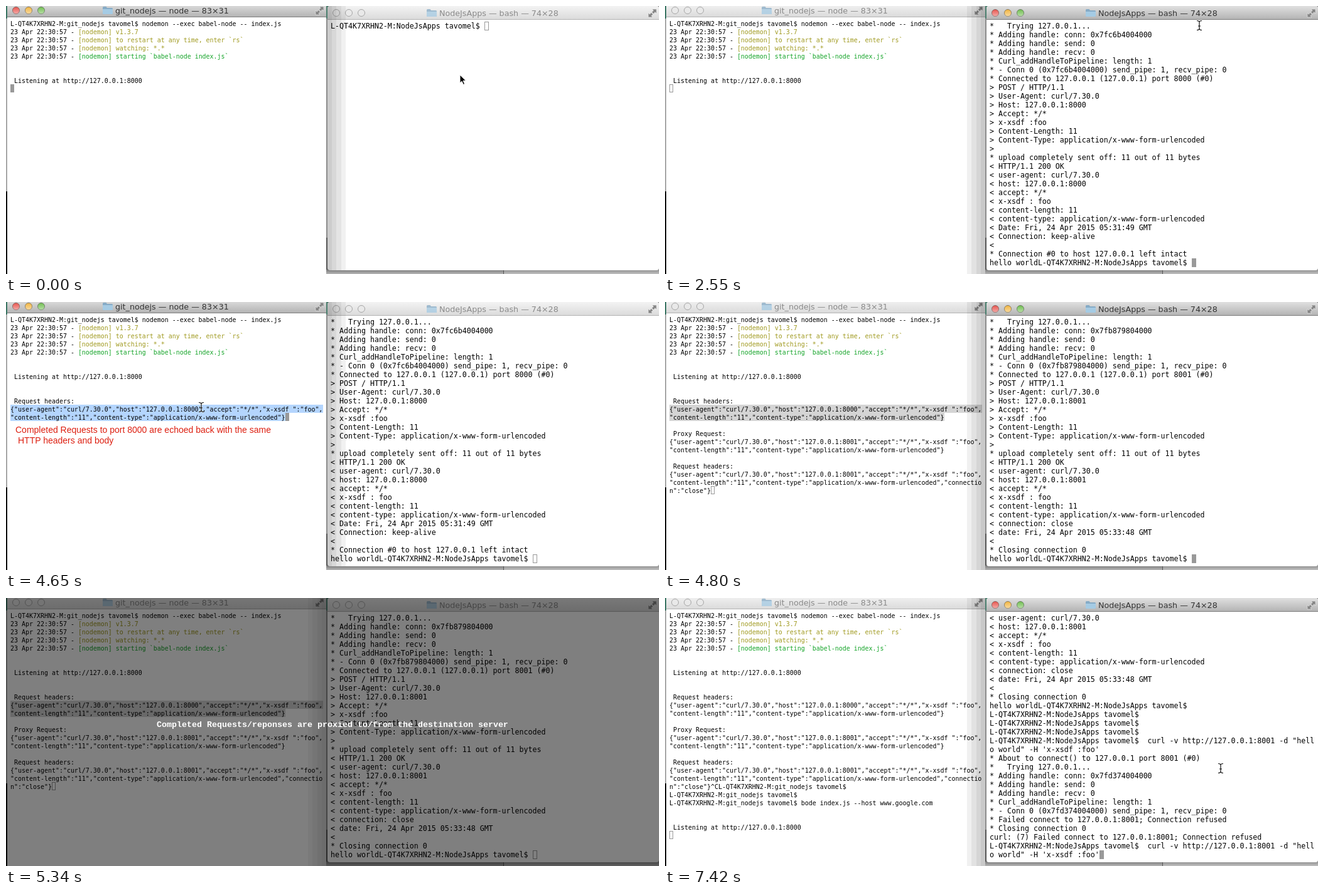
Write an HTML page that moves like this. It is 1040 by 428 pixels and loops after 8 s.

```html
<!DOCTYPE html>
<html lang="en">
<head>
<meta charset="utf-8">
<title>Echo and proxy server</title>
<style>
html, body { margin: 0; width: 100%; height: 100%; overflow: hidden; background: #8c8c8c; }
svg { display: block; width: 1040px; height: 428px; }
text { white-space: pre; }
.small { font: 9.967px "DejaVu Sans Mono", monospace; }
.large { font: 11.627px "DejaVu Sans Mono", monospace; }
.title { font: 12.7px "DejaVu Sans", sans-serif; fill: #8a8a8a; }
.active .title { fill: #333; }
.note { font: 14px "Liberation Sans", Arial, sans-serif; fill: #dd1f10; }
.caption { font: bold 13.33px "Liberation Mono", monospace; fill: #fff; }
.scene { visibility: hidden; }
</style>
</head>
<body>
<svg id="stage" viewBox="0 0 1040 428" xmlns="http://www.w3.org/2000/svg">
  <defs>
    <linearGradient id="barOn" x2="0" y2="1"><stop stop-color="#e0e0e0"/><stop offset="1" stop-color="#b2b2b2"/></linearGradient>
    <linearGradient id="barOff" x2="0" y2="1"><stop stop-color="#f3f3f3"/><stop offset="1" stop-color="#dadada"/></linearGradient>
    <linearGradient id="gloss" x2="0" y2="1"><stop stop-color="#fff" stop-opacity=".1"/><stop offset="1" stop-color="#fff" stop-opacity=".55"/></linearGradient>
    <linearGradient id="floor" x2="0" y2="1"><stop stop-color="#7c7c7c"/><stop offset="1" stop-color="#b4b4b4"/></linearGradient>
    <g id="folder">
      <path d="M0 2.5q0-1.5 1.5-1.5h4l1.5 2h7.500q1.500 0 1.500 1.500V12q0 1-1 1H1q-1 0-1-1z" fill="#86abc6"/>
      <path d="M0 5h16v7q0 1-1 1H1q-1 0-1-1z" fill="#a5cbe4"/>
    </g>
    <path id="expand" d="M6 0h7v7l-2.200-2.200-2.600 2.600-2.600-2.600L8.200 2.200zM7 13H0V6l2.200 2.200 2.600-2.600 2.600 2.600L4.800 10.800z" fill="#858585" stroke="#eee" stroke-width=".6"/>
    <path id="beam" d="M-4-7.500q4 0 4 2.500q0-2.500 4-2.500M0-5V5M-4 7.500q4 0 4-2.500q0 2.500 4 2.500M-2 1h4" fill="none"/>
    <path id="arrow" d="M0 0v13l3-2.800 2.300 5.300 2.200-1-2.300-5.200h4.300z" fill="#000" stroke="#fff"/>
  </defs>
  <g id="desktop">
    <rect width="1040" height="428" fill="#8c8c8c"/>
    <rect width="2" height="296" fill="#a9a9a9"/>
    <rect y="296" width="2" height="132" fill="#0b0b0b"/>
    <rect width="2" height="20" fill="#3c7765"/>
    <rect x="506" width="8" height="20" fill="#4a7f6e"/>
    <rect x="510" y="370" width="2" height="58" fill="#555"/>
    <rect x="510" y="421" width="530" height="7" fill="url(#floor)"/>
    <rect x="792" y="421" width="1" height="7" fill="#555"/>
    <rect x="793" y="421" width="247" height="7" fill="#fff" opacity=".15"/>
  </g>
</svg>
<script>
const LOOP = 8000;
const HOST = 'L-QT4K7XRHN2-M', USER = 'tavomel';
const promptLeft = `${HOST}:git_nodejs ${USER}$`;
const promptRight = `${HOST}:NodeJsApps ${USER}$`;

// Terminal text
const stamp = '23 Apr 22:30:57 - [nodemon] ';
const boot = [
  promptLeft + ' nodemon --exec babel-node -- index.js',
  stamp + 'v1.3.7',
  stamp + 'to restart at any time, enter `rs`',
  stamp + 'watching: *.*',
  stamp + 'starting `babel-node index.js`',
  '', '', ' Listening at http://127.0.0.1:8000'
];
const agent = port => `{"user-agent":"curl/7.30.0","host":"127.0.0.1:${port}","accept":"*/*","x-xsdf ":"foo",`;
const body = '"content-length":"11","content-type":"application/x-www-form-urlencoded"';
const request = [...boot, '', '', ' Request headers:', agent(8000), body + '}'];
const proxied = [
  ...request, '', ' Proxy Request:', agent(8001), body + '}',
  '', ' Request headers:', agent(8001), body + ',"connectio', 'n":"close"}'
];
const stopped = [
  ...proxied.slice(0, -1), 'n":"close"}^C' + promptLeft, promptLeft,
  promptLeft + ' bode index.js --host www.google.com'
];

const curl = port => [
  `${promptRight}  curl -v http://127.0.0.1:${port} -d "hell`,
  `o world" -H 'x-xsdf :foo'`
];
const connect = id => [
  '*   Trying 127.0.0.1...',
  `* Adding handle: conn: ${id}`,
  '* Adding handle: send: 0',
  '* Adding handle: recv: 0',
  '* Curl_addHandleToPipeline: length: 1',
  `* - Conn 0 (${id}) send_pipe: 1, recv_pipe: 0`
];
const exchange = (port, id, ending) => [
  ...connect(id),
  `* Connected to 127.0.0.1 (127.0.0.1) port ${port} (#0)`,
  '> POST / HTTP/1.1',
  '> User-Agent: curl/7.30.0',
  `> Host: 127.0.0.1:${port}`,
  '> Accept: */*',
  '> x-xsdf :foo',
  '> Content-Length: 11',
  '> Content-Type: application/x-www-form-urlencoded',
  '>',
  '* upload completely sent off: 11 out of 11 bytes',
  '< HTTP/1.1 200 OK',
  '< user-agent: curl/7.30.0',
  `< host: 127.0.0.1:${port}`,
  '< accept: */*',
  '< x-xsdf : foo',
  '< content-length: 11',
  '< content-type: application/x-www-form-urlencoded',
  ...ending,
  `hello world${promptRight} `
];
const echoed = exchange(8000, '0x7fc6b4004000', [
  '< Date: Fri, 24 Apr 2015 05:31:49 GMT', '< Connection: keep-alive', '<',
  '* Connection #0 to host 127.0.0.1 left intact'
]);
const relayed = exchange(8001, '0x7fb879804000', [
  '< connection: close', '< date: Fri, 24 Apr 2015 05:33:48 GMT', '<',
  '* Closing connection 0'
]);
const prompts = Array(4).fill(promptRight + ' ');
const refused = [
  ...relayed.slice(17), ...prompts.slice(1), ...curl(8001),
  '* About to connect() to 127.0.0.1 port 8001 (#0)',
  ...connect('0x7fd374004000'),
  '* Failed connect to 127.0.0.1:8001; Connection refused',
  '* Closing connection 0',
  'curl: (7) Failed connect to 127.0.0.1:8001; Connection refused',
  ...curl(8001)
];

// Drawing helpers
const rect = (x, y, w, h, fill, more = '') =>
  `<rect x="${x}" y="${y}" width="${w}" height="${h}" fill="${fill}" ${more}/>`;
const esc = s => s.replace(/&/g, '&amp;').replace(/</g, '&lt;').replace(/>/g, '&gt;');
const label = (x, y, cls, s) => `<text x="${x}" y="${y}" class="${cls}">${s}</text>`;

const LEFT = {
  x: 2, y: -4, w: 508, h: 440, bar: 22, title: 'git_nodejs — node — 83×31', titleX: 174,
  font: 'small', textX: 7, top: 21, charW: 6, rowH: 13, base: 11
};
const RIGHT = {
  x: 512, y: 0, w: 528, h: 422, bar: 22, title: 'NodeJsApps — bash — 74×28', titleX: 690,
  font: 'large', textX: 517, top: 25, charW: 7, rowH: 14, base: 11
};

function line(win, s, i) {
  const cut = s.indexOf('[nodemon]');
  const color = s.includes('starting') ? '#14a428' : '#a09a20';
  const html = cut < 0 ? esc(s)
    : `${esc(s.slice(0, cut))}<tspan fill="${color}">${esc(s.slice(cut))}</tspan>`;
  return s && label(win.textX, win.top + win.base + i * win.rowH, win.font, html);
}

function cursor(win, rows, on) {
  const last = rows.length - 1;
  const x = win.textX + rows[last].length * win.charW, y = win.top + last * win.rowH;
  return on ? rect(x, y, win.charW, win.rowH, '#999')
    : rect(x + .5, y + .5, win.charW - 1, win.rowH - 1, 'none', 'stroke="#999"');
}

function lights(x, y, on) {
  return ['#e5433c', '#f0ad2c', '#62b83e'].map((c, i) => {
    const dot = (fill, stroke) =>
      `<circle cx="${x + i * 20}" cy="${y}" r="5.500" fill="${fill}" stroke="${stroke}"/>`;
    return on ? dot(c, '#0006') + dot('url(#gloss)', 'none') : dot('#e9e9e9', '#a6a6a6');
  }).join('');
}

function terminal(win, rows, on, under = '') {
  const { x, y, w, h, bar } = win;
  return `<g class="${on ? 'active' : ''}">`
    + rect(x, y, w, h, '#fff', 'rx="4"')
    + `<path d="M${x} ${y + bar}v${4 - bar}q0-4 4-4h${w - 8}q4 0 4 4v${bar - 4}z" fill="url(#bar${on ? 'On' : 'Off'})"/>`
    + rect(x, y + bar - 1, w, 1, on ? '#7d7d7d' : '#b4b4b4')
    + lights(x + 14, y + 11, on)
    + `<use href="#folder" x="${win.titleX - 20}" y="${y + 4}" opacity="${on ? 1 : .75}"/>`
    + label(win.titleX, y + 16, 'title', win.title)
    + `<use href="#expand" x="${x + w - 17}" y="${y + 5}"/>`
    + under + cursor(win, rows, on)
    + rows.map((s, i) => line(win, s, i)).join('') + '</g>';
}

// Banded shadow that the front window casts on its neighbour
const shade = (edge, dir, height, alpha) => [29, 22, 14, 7].map(w =>
  rect(dir < 0 ? edge - w : edge, 0, w, height, '#000', `opacity="${alpha}"`)).join('');

const selection = color => rect(7, 164, 498, 13, color) + rect(7, 177, 438, 13, color);
const beam = (x, y) => `<g transform="translate(${x} ${y})">`
  + '<use href="#beam" stroke="#fff" stroke-width="2.500" opacity=".7"/><use href="#beam" stroke="#111" stroke-width="1.200"/></g>';
const note = label(15, 209, 'note', 'Completed Requests to port 8000 are echoed back with the same')
  + label(19, 226, 'note', 'HTTP headers and body');
const caption = rect(0, 0, 1040, 428, '#000', 'opacity=".5"')
  + label(240, 206, 'caption', 'Completed Requests/reponses are proxied to/from the destination server');

function draw({ front, left, right, select, over = '' }) {
  return terminal(LEFT, left, front === 'left', select ? selection(select) : '')
    + (front === 'left' ? '' : shade(510, -1, 428, front ? .06 : .04))
    + terminal(RIGHT, right, front === 'right')
    + (front === 'left' ? shade(512, 1, 422, .055) : '')
    + over;
}

const idle = [...boot, ''];
const scenes = [
  { at: 0, front: 'left', left: idle, right: [promptRight + ' '], over: '<use href="#arrow" x="723" y="110"/>' },
  { at: 150, front: 'right', left: idle, right: curl(8000), over: beam(851, 31) },
  { at: 2550, front: 'right', left: idle, right: echoed, over: beam(851, 31) },
  { at: 2700, front: 'right', left: request, right: echoed, over: beam(866, 406) },
  { at: 4650, front: 'left', left: request, right: echoed, select: '#b4d5fe', over: note + beam(311, 168) },
  { at: 4800, front: 'right', left: proxied, right: relayed, select: '#d4d4d4' },
  { at: 5240, left: proxied, right: relayed, select: '#d4d4d4' },
  { at: 5340, left: proxied, right: relayed, select: '#d4d4d4', over: caption },
  { at: 7270, front: 'right', left: stopped, right: [...relayed.slice(4), ...prompts], over: beam(846, 401) },
  {
    at: 7420, front: 'right', right: refused, over: beam(885, 272),
    left: [...stopped, '', '', ' Listening at http://127.0.0.1:8000', '']
  }
];

// One hard-cut visibility track per scene
const pct = ms => ms / LOOP * 100 + '%';
const css = scenes.map(({ at }, i) => {
  const end = i + 1 < scenes.length ? scenes[i + 1].at : LOOP;
  const before = at ? '0% { visibility: hidden }' : '';
  const after = end < LOOP ? `${pct(end)} { visibility: hidden }` : '100% { visibility: visible }';
  return `@keyframes scene${i} { ${before} ${pct(at)} { visibility: visible } ${after} }
    #scene${i} { animation: scene${i} ${LOOP}ms step-end infinite }`;
}).join('\n');

document.head.insertAdjacentHTML('beforeend', `<style>${css}</style>`);
document.getElementById('stage').insertAdjacentHTML('beforeend',
  scenes.map((s, i) => `<g class="scene" id="scene${i}">${draw(s)}</g>`).join(''));
</script>
</body>
</html>
```
